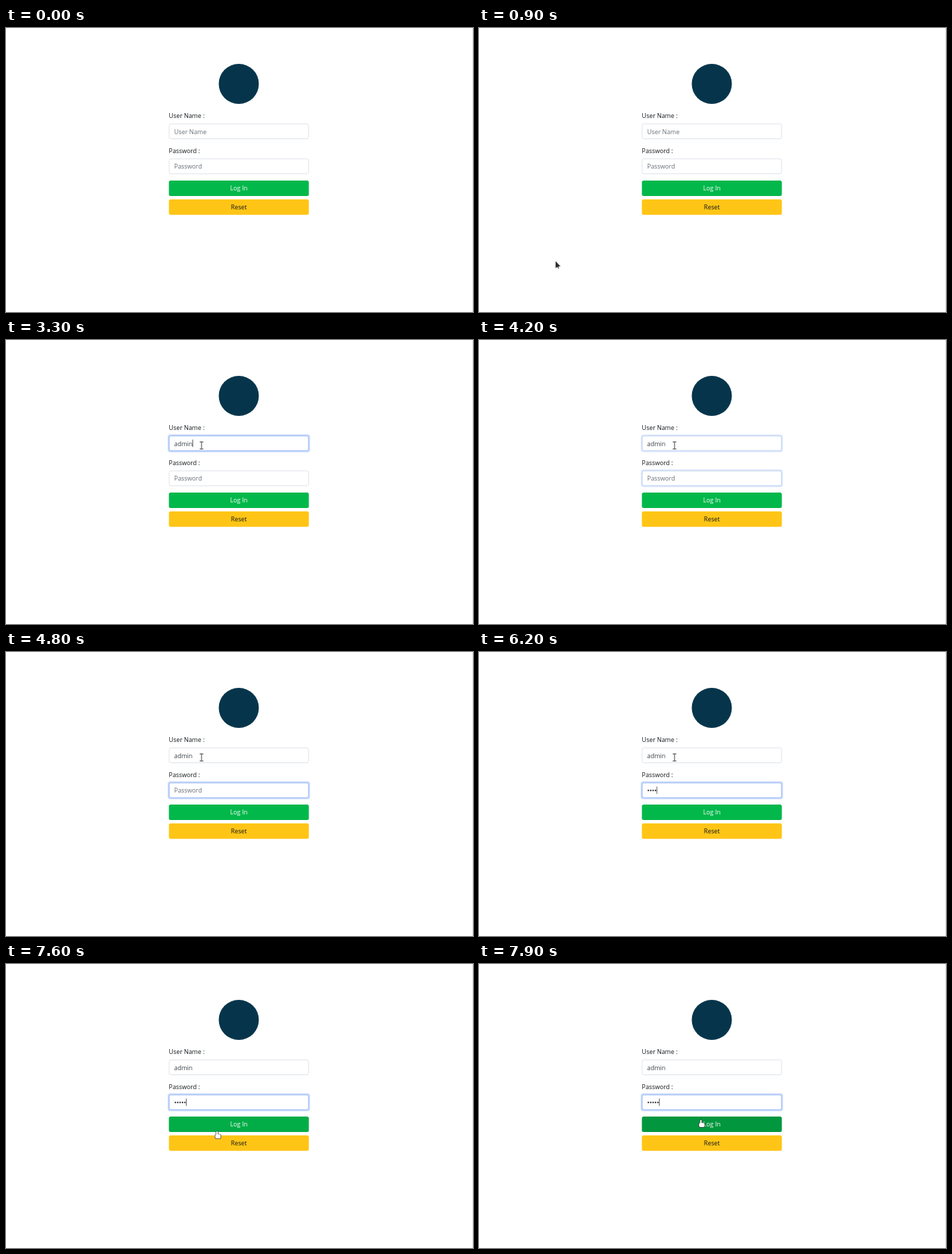
An HTML page with a canvas that plays this animation: 664 px wide and 404 px high, repeating every 8 s.

```html
<!DOCTYPE html>
<html lang="en">
<head>
<meta charset="utf-8">
<title>Login form</title>
<style>
  html, body { margin: 0; width: 100%; height: 100%; overflow: hidden; background: #fff; }
  canvas { display: block; width: 664px; height: 404px; }
</style>
</head>
<body>
<canvas id="stage"></canvas>
<script>
const W = 664, H = 404, LOOP = 8000, STEP = 100;
const canvas = document.getElementById('stage');
const ctx = canvas.getContext('2d');
const ratio = window.devicePixelRatio || 1;
canvas.width = W * ratio;
canvas.height = H * ratio;

const FONT = '500 8.8px "Open Sans", "Noto Sans", sans-serif';
const INK = '#14181c', MUTED = '#686f77', TYPED = '#3a4046';
const LEFT = 231.6, WIDTH = 199, HEIGHT = 22, TEXT_X = LEFT + 7.5;
const USER_Y = 136, PASSWORD_Y = 185.7, LOGIN_Y = 217, RESET_Y = 243.7;

const USER = 'admin';
const FOCUS_USER = 2000, FOCUS_PASSWORD = 4300;
const userKeys = [...USER].map((_, i) => 2750 + 125 * i);
const passwordKeys = [...USER].map((_, i) => 5400 + 75 * i * i); // typing slows down
const actions = [FOCUS_USER, ...userKeys, FOCUS_PASSWORD, ...passwordKeys];

const countUntil = (times, t) => times.filter(k => k <= t).length;
const ramp = (t, from, to) => Math.min(1, Math.max(0, (t - from) / (to - from)));
const point = (x, y) => ({ x, y });

// Quadratic curve with a slight ease-out
function glide(t, start, from, bend, to) {
  const u = 1 - (1 - ramp(t, start, start + 900)) ** 1.2, v = 1 - u;
  const at = k => v * v * from[k] + 2 * u * v * bend[k] + u * u * to[k];
  return point(at('x'), at('y'));
}

const entry = point(33, 304), rest = point(109, 332);
const inField = point(278, 150), onButton = point(315.5, 221.5);

function pointerAt(t) {
  if (t < 1000) {
    const u = ramp(t, 400, 900);
    return point(entry.x + (rest.x - entry.x) * u, entry.y + (rest.y - entry.y) * u);
  }
  return t < 7000 ? glide(t, 1000, rest, point(178, 229), inField)
                  : glide(t, 7000, inField, point(283, 276), onButton);
}

function rect(x, y, w, h, r) {
  ctx.beginPath();
  ctx.roundRect(x, y, w, h, r);
}

function disc(x, y, r, color) {
  ctx.fillStyle = color;
  ctx.beginPath();
  ctx.arc(x, y, r, 0, Math.PI * 2);
  ctx.fill();
}

function text(str, x, y, color, align = 'left') {
  ctx.fillStyle = color;
  ctx.textAlign = align;
  ctx.fillText(str, x, y);
}

function field(y, label, focus) {
  text(label, LEFT, y - 8, INK);
  ctx.fillStyle = `rgba(70, 130, 250, ${0.28 * focus})`;
  rect(LEFT - 1.7, y - 1.7, WIDTH + 3.4, HEIGHT + 3.4, 3.5);
  ctx.fill();
  rect(LEFT + 0.4, y + 0.4, WIDTH - 0.8, HEIGHT - 0.8, 2.5);
  ctx.fillStyle = '#fff';
  ctx.fill();
  ctx.lineWidth = 0.9;
  ctx.strokeStyle = '#dce0e6';
  ctx.stroke();
  ctx.strokeStyle = `rgba(145, 182, 250, ${focus})`;
  ctx.stroke();
}

function button(y, label, color, textColor) {
  ctx.fillStyle = color;
  rect(LEFT, y, WIDTH, HEIGHT, 2.5);
  ctx.fill();
  text(label, LEFT + WIDTH / 2, y + 14.3, textColor, 'center');
}

function arrow() {
  const path = new Path2D('M0 0V9.5L2.4 7.6L4.2 11L4 7H6.7Z');
  ctx.strokeStyle = '#c8c8c8';
  ctx.lineWidth = 1;
  ctx.stroke(path);
  ctx.fillStyle = '#2c2c2c';
  ctx.fill(path);
}

function beam() {
  ctx.strokeStyle = '#707070';
  ctx.lineWidth = 1.3;
  ctx.stroke(new Path2D('M-2.5 -5h5M0 -5v10M-2.5 5h5'));
}

function hand() {
  const path = new Path2D();
  path.roundRect(-1, 0.3, 2, 8, 1);
  path.roundRect(-2.6, 4.6, 7.8, 6, 2);
  ctx.strokeStyle = '#3a3a3a';
  ctx.lineWidth = 1.4;
  ctx.stroke(path);
  ctx.fillStyle = '#fff';
  ctx.fill(path);
}

function drawPointer({ x, y }) {
  const over = top => x > LEFT && x < LEFT + WIDTH && y > top && y < top + HEIGHT;
  const draw = over(USER_Y) || over(PASSWORD_Y) ? beam
             : over(LOGIN_Y) || over(RESET_Y) ? hand : arrow;
  ctx.save();
  ctx.translate(x, y);
  draw();
  ctx.restore();
}

function drawCaret(t, x, y) {
  const last = Math.max(...actions.filter(a => a <= t));
  if ((t - last) % 1000 >= 500) return;
  ctx.fillStyle = '#4a4e54';
  ctx.fillRect(x, y + 5.7, 0.9, 10.5);
}

function render(t) {
  ctx.setTransform(ratio, 0, 0, ratio, 0, 0);
  ctx.fillStyle = '#fff';
  ctx.fillRect(0, 0, W, H);
  ctx.fillStyle = '#e2e2e2';
  ctx.fillRect(W - 1, 0, 1, H);
  ctx.font = FONT;

  disc(331, 79.5, 28.5, '#06354b');

  const tab = ramp(t, FOCUS_PASSWORD - 200, FOCUS_PASSWORD);
  const typed = USER.slice(0, countUntil(userKeys, t));
  const dots = countUntil(passwordKeys, t);

  field(USER_Y, 'User Name :', t < FOCUS_USER ? 0 : 1 - tab);
  text(typed || 'User Name', TEXT_X, USER_Y + 14.5, typed ? TYPED : MUTED);

  field(PASSWORD_Y, 'Password :', tab);
  if (!dots) text('Password', TEXT_X, PASSWORD_Y + 14.5, MUTED);
  for (let i = 0; i < dots; i++) disc(TEXT_X + 1.7 + i * 3.4, PASSWORD_Y + 11.3, 1.15, TYPED);

  if (t >= FOCUS_PASSWORD) drawCaret(t, TEXT_X + dots * 3.35, PASSWORD_Y);
  else if (t >= FOCUS_USER) drawCaret(t, TEXT_X + ctx.measureText(typed).width, USER_Y);

  const shade = 0.06 * ramp(t, 7200, 7400) + 0.12 * ramp(t, 7700, 7900);
  button(LOGIN_Y, 'Log In', `rgb(2, ${184 * (1 - shade)}, ${75 * (1 - shade)})`, '#fff');
  button(RESET_Y, 'Reset', '#ffc516', INK);

  if (t >= 400) drawPointer(pointerAt(t));
}

const start = performance.now();
function tick() {
  const t = (performance.now() - start) % LOOP;
  render(Math.floor(t / STEP) * STEP);
  requestAnimationFrame(tick);
}
tick();
</script>
</body>
</html>
```
